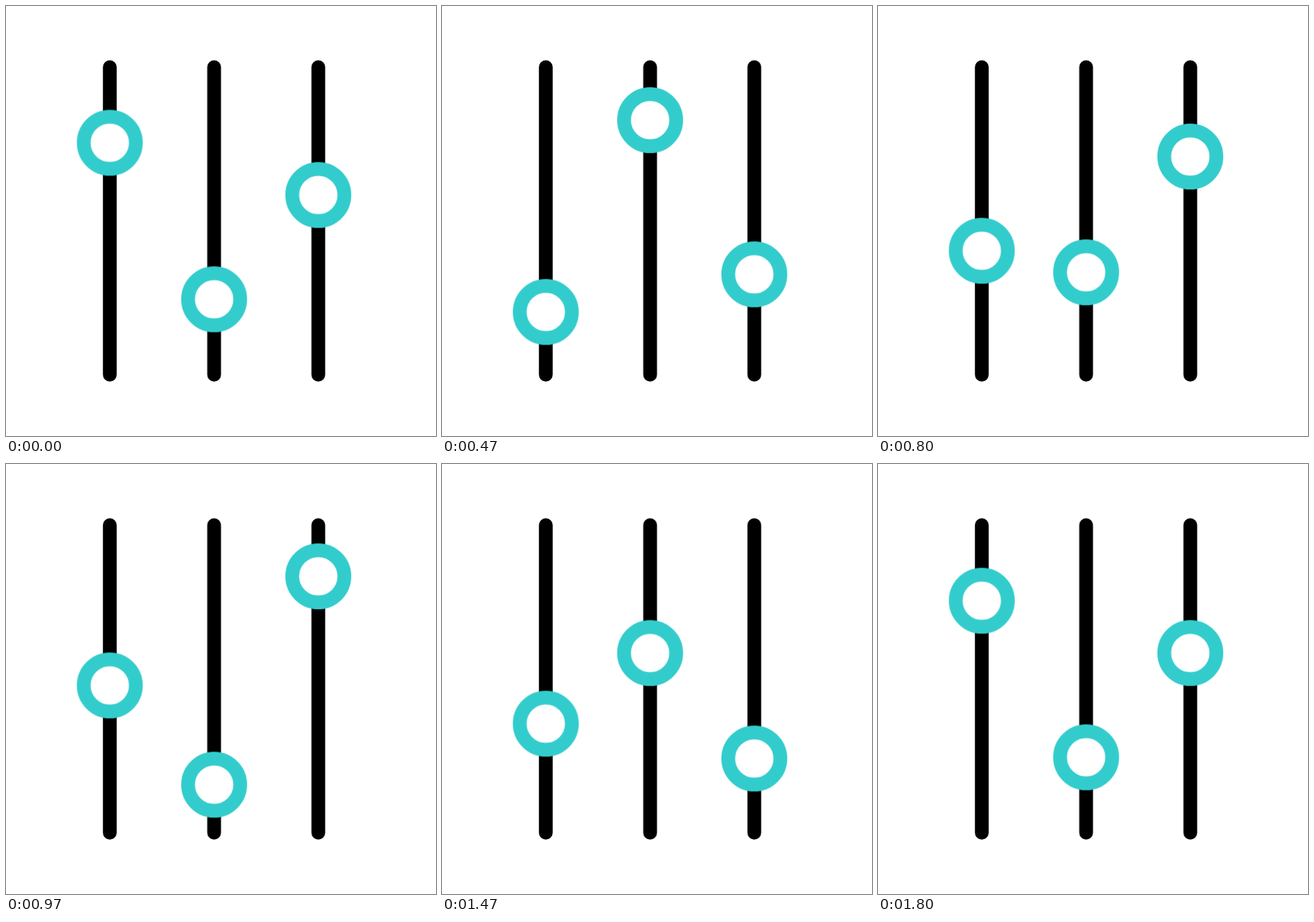
These frames come from a looping animation (640x640 px, 2 s). An HTML page without scripts:

```html
<!DOCTYPE html>
<html lang="en">
<head>
<meta charset="utf-8">
<title>Sliders</title>
<style>
  html, body { margin: 0; width: 100%; height: 100%; overflow: hidden; background: #fff; }
  svg { display: block; width: 100%; height: 100%; }
  .track { stroke: #000; stroke-width: 20.5; stroke-linecap: round; }
  .knob {
    fill: #fff; stroke: #3cc; stroke-width: 20.5;
    animation: slide 2s cubic-bezier(.283, 0, .717, 1) infinite;
  }
  /* --a is the rest position, --b to --d are the turning points */
  .left   { --a: 203.5px; --b: 467.5px; --c: 326px; --d: 439.7px; }
  .middle { --a: 436.5px; --b: 157px;   --c: 485px; --d: 236.2px; }
  .right  { --a: 281.3px; --b: 405px;   --c: 157px; --d: 484px; }
  @keyframes slide {
    0%, 90%, 100% { transform: translateY(var(--a)); }
    26.667% { transform: translateY(var(--b)); }
    46.667% { transform: translateY(var(--c)); }
    66.667% { transform: translateY(var(--d)); }
  }
</style>
</head>
<body>
<svg viewBox="0 0 640 640">
  <defs>
    <path id="track" class="track" d="M0 91V548.7"/>
  </defs>
  <g transform="translate(154.5)">
    <use href="#track"/>
    <circle class="knob left" r="38.8"/>
  </g>
  <g transform="translate(309.75)">
    <use href="#track"/>
    <circle class="knob middle" r="38.8"/>
  </g>
  <g transform="translate(464.8)">
    <use href="#track"/>
    <circle class="knob right" r="38.8"/>
  </g>
</svg>
</body>
</html>
```
